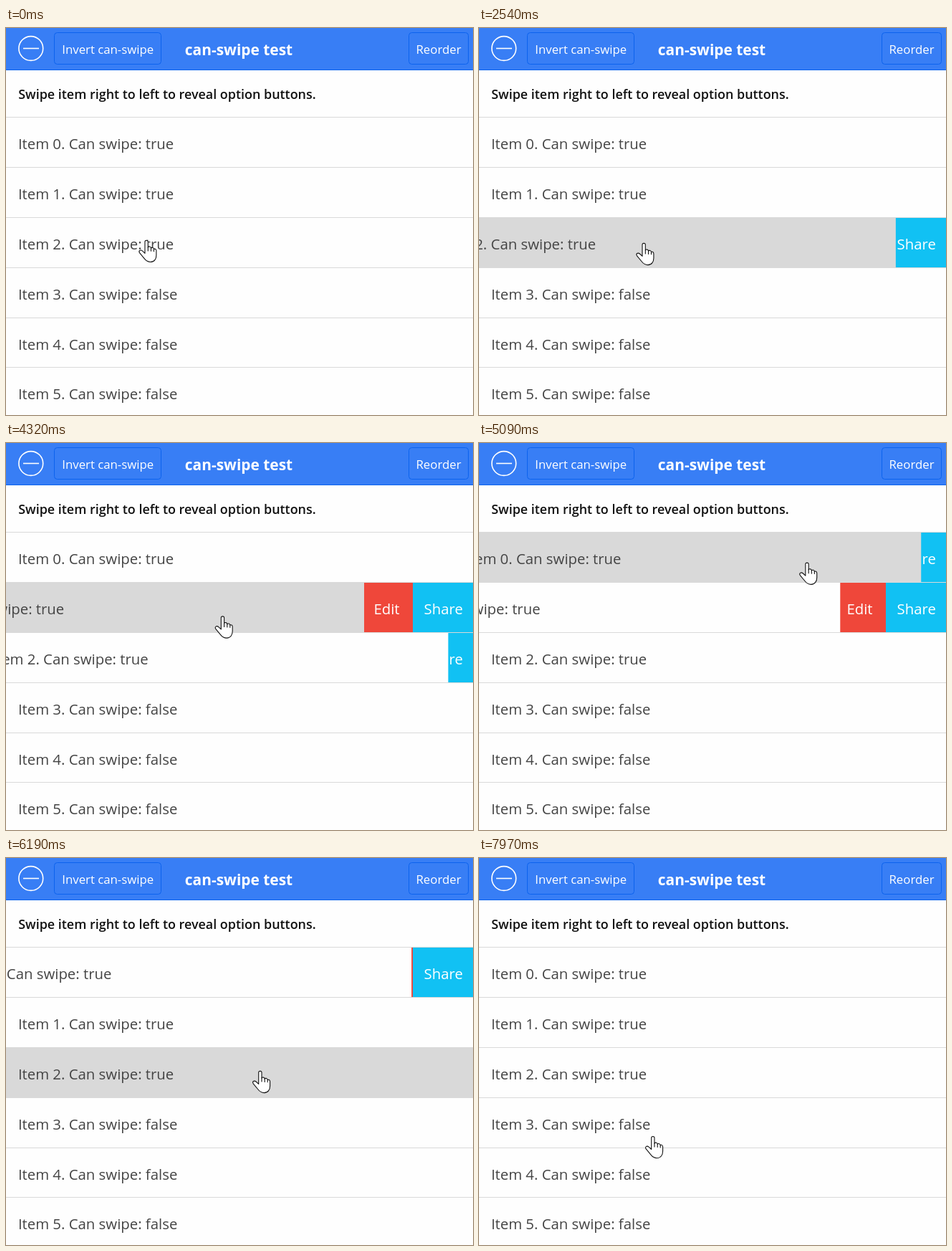
Animation, 652 px wide and 540 px high, one loop 8 s. Source, as an HTML page:

```html
<!DOCTYPE html>
<html lang="en">
<head>
<meta charset="utf-8">
<title>can-swipe test</title>
<style>
  html, body { margin: 0; width: 100%; height: 100%; overflow: hidden; background: #fefefe; }
  svg { display: block; width: 100vw; height: 100vh; font-family: "Open Sans", "Noto Sans", sans-serif; }
  text { font-size: 20.35px; fill: #444; }
  .bar text { fill: #fff; font-size: 16.8px; text-anchor: middle; }
  .bar .title { font-size: 20.9px; font-weight: 700; }
  .btn { fill: none; stroke: #0c63ee; }
  .hint { font-size: 17.93px; font-weight: 600; fill: #111; }
  .opt text { fill: #fff; text-anchor: middle; }
</style>
</head>
<body>
<svg viewBox="0 0 652 540">
  <rect width="652" height="540" fill="#fefefe"/>
  <g id="list"></g>
  <text class="hint" x="17.2" y="99">Swipe item right to left to reveal option buttons.</text>
  <g class="bar">
    <rect width="652" height="58" fill="#387ef5"/>
    <rect y="58" width="652" height="1" fill="#0c63ee"/>
    <g fill="none" stroke="#fff" stroke-width="1.6">
      <circle cx="34.8" cy="28.5" r="16.9"/>
      <path d="M24 28.5H46"/>
    </g>
    <rect class="btn" x="67.5" y="6.5" width="149" height="44" rx="4"/>
    <text x="142.3" y="36">Invert can-swipe</text>
    <text class="title" x="325" y="38">can-swipe test</text>
    <rect class="btn" x="562.5" y="6.5" width="83" height="44" rx="4"/>
    <text x="604" y="36">Reorder</text>
  </g>
  <g id="hand" stroke="#111" stroke-width="1.1" stroke-linejoin="round" stroke-linecap="round">
    <path fill="#fff" d="M-2.3 2.6C-2.3-.4 2-.4 2 2.6V10C3 8.4 6.2 8.8 6.2 11.2C7.4 9.8 10 10.4 10.2 12.6C11.6 11.6 13.6 12.6 13.6 15V21C13.6 26 11 30.6 5.5 30.6C1 30.6-1 28.6-3 26L-9.8 17.8C-11.6 15-8.6 12.9-6 15L-2.3 18.4Z"/>
    <path fill="none" d="M2 10V15M6.2 11.2V15.4M10.2 12.6V15.8"/>
  </g>
</svg>
<script>
const LOOP = 8000, FIRST = 100, STEP = 110.6;
const OPEN = 153, CLOSE_MS = 250, RELEASE_MS = 70;
const TAP = { row: 2, from: 6075, to: 6400 };

// Each drag opens a row over dur; the row closes again at shut
const DRAGS = [
  { row: 2, press: 2310, dur: 480, shut: 3067 },
  { row: 2, press: 3430, dur: 250, shut: 4111 },
  { row: 1, press: 4080, dur: 210, shut: 5070 },
  { row: 0, press: 4980, dur: 415, shut: TAP.from }
];

// Turning points of the cursor between its two circling gestures: time, x, y
const TURNS = [
  [1780, 196, 299], [2020, 250, 343], [2310, 302, 300], [2640, 196, 300], [3070, 230, 263],
  [3300, 306, 296], [3430, 306, 296], [3700, 160, 285], [4080, 455, 238], [4295, 304, 241],
  [4540, 260, 258], [4980, 494, 165], [5310, 372, 171], [6060, 355, 297], [6760, 355, 297],
  [7180, 258, 375]
];

const ramp = (t, start, dur) => Math.min(1, Math.max(0, (t - start) / dur));
const lineY = i => Math.round(124.4 + 69.8 * i);

function rowMarkup(i) {
  const y = lineY(i), h = lineY(i + 1) - y, base = y + 45, swipe = i < 3;
  const options = swipe ? `<g class="opt">
    <rect x="500" y="${y}" width="68" height="${h}" fill="#ef473a"/>
    <rect x="568" y="${y}" width="84" height="${h}" fill="#11c1f3"/>
    <text x="531.5" y="${base}">Edit</text><text x="610.7" y="${base}">Share</text></g>` : '';
  return `${options}<g class="cell">
    <rect y="${y}" width="653" height="${h}" fill="#fefefe"/>
    <text x="16.9" y="${base}">Item ${i}. Can swipe: ${swipe}</text></g>
    <rect y="${y}" width="652" height="1" fill="#d9d9d9"/>`;
}

const list = document.getElementById('list');
const hand = document.getElementById('hand');
list.innerHTML = [0, 1, 2, 3, 4, 5].map(rowMarkup).join('');
const cells = [...list.querySelectorAll('.cell')].slice(0, 3);

function shiftOf(row, t) {
  return DRAGS.filter(d => d.row === row).reduce((sum, d) =>
    sum + OPEN * (ramp(t, d.press, d.dur) - ramp(t, d.shut, CLOSE_MS)), 0);
}

function isPressed(row, t) {
  const tapped = row === TAP.row && t >= TAP.from && t < TAP.to;
  return tapped || DRAGS.some(d =>
    d.row === row && t >= d.press && t < d.press + d.dur + RELEASE_MS);
}

const orbit = (cx, cy, rx, ry, a) => [cx + rx * Math.cos(a), cy - ry * Math.sin(a)];

function cursorAt(t) {
  if (t < TURNS[0][0]) return orbit(222, 299, 26, 22, 3 + t / 890 * 2 * Math.PI);
  if (t > 7300) {
    const p = ramp(t, 7300, 653);
    return orbit(215, 375, 43 - 11 * p, 27, 5.78 * p);
  }
  const i = TURNS.findLastIndex(k => k[0] <= t);
  const a = TURNS[i], b = TURNS[i + 1] || a;
  const p = ramp(t, a[0], b[0] - a[0] || 1);
  return [1, 2].map(c => a[c] + (b[c] - a[c]) * p);
}

function draw(time) {
  // The picture changes in even steps
  const t = Math.max(0, FIRST + Math.floor((time - FIRST) / STEP) * STEP);
  cells.forEach((cell, row) => {
    cell.setAttribute('transform', `translate(${-shiftOf(row, t)})`);
    cell.firstElementChild.setAttribute('fill', isPressed(row, t) ? '#d9d9d9' : '#fefefe');
  });
  hand.setAttribute('transform', `translate(${cursorAt(t)})`);
}

const begin = performance.now();
function frame() {
  draw((performance.now() - begin) % LOOP);
  requestAnimationFrame(frame);
}
frame();
</script>
</body>
</html>
```
